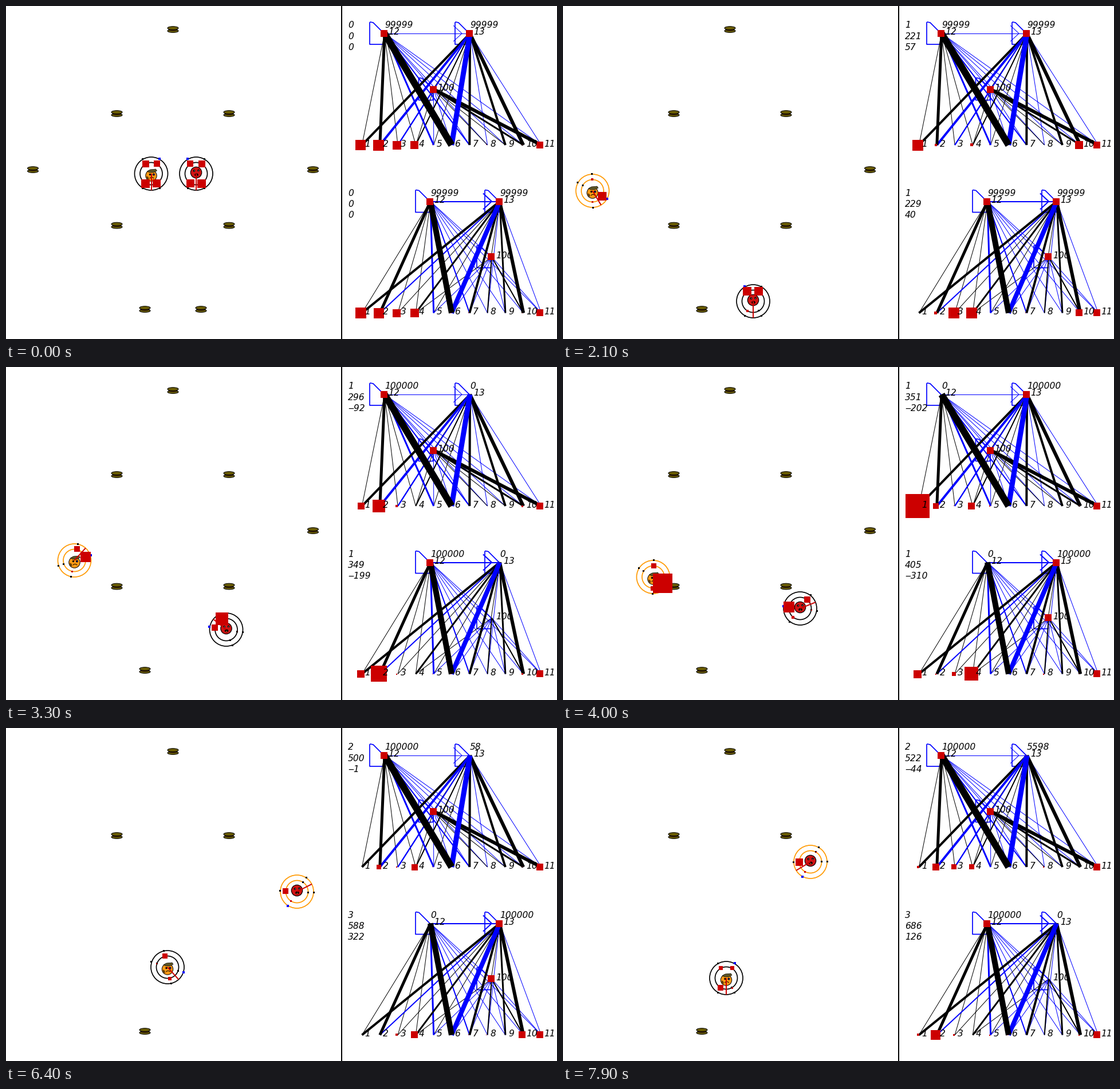
A matplotlib script for the animation above (8000 ms loop, 962 px wide and 582 px high).

```python
import numpy as np
import matplotlib.pyplot as plt
from matplotlib.animation import FuncAnimation
from matplotlib.patches import Arc, Circle, Ellipse, Polygon, Rectangle
from matplotlib.transforms import Affine2D

W, H, DPI = 962, 582, 64
PX = 72 / DPI
FRAMES, STEP = 80, 100
RED, BLUE, ORANGE = "#cc0000", "#0000ff", "#ff9900"
SENSORS = np.array([-30, 30, 150, 210])
EAT = 38        # reach of an agent
CRUISE = 21     # both motors run full until this frame
SWING = 2.4     # frames per half swing of the heading

plt.rcParams.update({"font.family": "DejaVu Sans", "font.style": "oblique",
                     "font.size": 15.5 * PX, "lines.solid_capstyle": "butt"})
fig = plt.figure(figsize=(W / DPI, H / DPI), dpi=DPI, facecolor="white")
ax = fig.add_axes([0, 0, 1, 1])
ax.set(xlim=(0, W), ylim=(H, 0))
ax.axis("off")


def line(xs, ys, color="k", width=1, z=1):
    return ax.plot(xs, ys, color=color, lw=width * PX, zorder=z)[0]


def label(x, y, s=""):
    return ax.text(x, y, s, color="k", va="baseline", zorder=9)


def square(color=RED, z=6):
    return ax.add_patch(Rectangle((0, 0), 0, 0, fc=color, ec="none", zorder=z))


def resize(box, x, y, size):
    size = int(round(size))
    box.set_bounds(round(x - size / 2), round(y - size / 2), size, size)


def sprite(parts, z):
    move = Affine2D()
    for p in parts:
        p.set_transform(move + ax.transData)
        p.set_zorder(z)
        ax.add_artist(p)
    return move


def burger_parts():
    bun = dict(fc="#6b5d00", ec="k", lw=PX)
    return [Ellipse((0, 2.6), 19, 5.6, **bun),
            Ellipse((0, 0.4), 15, 3.5, fc="#5a2a10", ec="k", lw=0.8 * PX),
            Ellipse((0, -2.4), 19, 5.8, **bun)]


def orange_face():
    return [Circle((0, 3.5), 9.7, fc="#ff9a14", ec="k", lw=PX),
            Polygon([(-7, -4), (-2, -7), (8, -8), (10, -5), (4, -2), (-3, -2)],
                    fc="#5c5426", ec="k", lw=0.6 * PX),
            Circle((-2, 1.5), 1.7, fc="k"), Circle((4.5, 1.5), 2, fc="k"),
            Circle((5, 1.5), 0.9, fc="#3030c0"),
            Polygon([(-8, 4), (-5, 6), (-4, 10), (-6, 10), (-8, 8)], fc="#5c3a08"),
            Arc((1, 8.5), 7, 4, theta1=180, theta2=360, ec="k", lw=PX)]


def red_face():
    return [Circle((0, -2), 9.7, fc="#d01414", ec="k", lw=1.2 * PX),
            Circle((-3.5, -5), 1.9, fc="k"), Circle((4, -5.5), 1.9, fc="k"),
            Circle((-3, -5), 0.8, fc="#909090"), Circle((4, -5), 0.8, fc="#909090"),
            Ellipse((0.5, 2), 6.5, 5, fc="k"),
            Ellipse((0.5, 3), 3, 2, fc="#a05020")]


def wires(first, **bold):
    """Thin wires from input `first` on; bold such as k4=(1, 7) sets colour and width."""
    out = {n: ("k" if n < 5 else BLUE, 1) for n in range(first, 12)}
    for key, ns in bold.items():
        out.update({n: (BLUE if key[0] == "b" else "k", int(key[1:])) for n in ns})
    return out


class Net:
    """Wiring diagram with one square per node."""

    def __init__(self, dy, xs, hidden, wiring, arrow, gated):
        self.gated = gated
        inputs = [(619.5 + 31.3 * i, 243 + dy) for i in range(11)]
        motors = [(x, 48 + dy) for x in xs]
        self.nodes = inputs + motors + [hidden]
        for (x, y), wire in zip(motors + [hidden], wiring):
            for n, (color, width) in wire.items():
                bx, by = inputs[n - 1]
                line([x + 1, bx + 2], [y, by], color, width, 2 + width / 100)
        for (x, y), color in zip(motors, (BLUE, "k")):
            line([x + 1, hidden[0]], [y, hidden[1]], color)
        for x, y in motors + [hidden]:
            line([x, x - 19, x - 24, x - 25, x - 25, x, x],
                 [y, y - 19, y - 20, y - 19, y + 19, y + 19, y], BLUE, 1.7)
        (x0, y0), (x1, _) = motors
        line([x0, x1], [y0, y0], BLUE, arrow)
        line([x1 - 28, x1 - 13, x1 - 28], [y0 - 14, y0, y0 + 14], BLUE, arrow)

        for i, (x, y) in enumerate(inputs):
            label(x + 7, y + 2.5, str(i + 1))
        for n, (x, y) in zip(("12", "13"), motors):
            label(x + 7, y + 2, n)
        label(hidden[0] + 8, hidden[1] + 2.5, "100")
        self.values = [label(x + 1, y - 10) for x, y in motors]
        self.stats = [label(597, 38 + dy + 19.5 * i) for i in range(3)]
        self.boxes = [square(z=5) for _ in self.nodes]

    def update(self, inputs, motors, stats):
        hidden = motors[1] if self.gated else 1e5
        sizes = list(inputs) + [12 * m / 1e5 for m in (*motors, hidden)]
        for box, (x, y), s in zip(self.boxes, self.nodes, sizes):
            resize(box, x, y, s)
        for t, v in zip(self.values, motors):
            t.set_text(str(round(v)))
        for t, v in zip(self.stats, stats):
            t.set_text(str(int(v)).replace("-", "\u2012"))


def smell(x, y, angles, targets, gain):
    """How strongly each sensor direction picks up the targets."""
    total = np.zeros(len(angles))
    for tx, ty in targets:
        c = np.cos(angles - np.arctan2(ty - y, tx - x))
        total += np.clip(c, 0, 1) ** 2 / np.hypot(tx - x, ty - y)
    return gain * total


class Agent:
    """Runs along waypoints (frame, x, y, distance, heading), swinging as it goes."""

    def __init__(self, face, way, net):
        self.way, self.net = np.array(way, float), net
        self.rings = [ax.add_patch(Circle((0, 0), r, fill=False, lw=1.7 * PX, zorder=3))
                      for r in (19.5, 29)]
        self.face = sprite(face, 4)
        self.nose = line([0, 0], [0, 0], RED, 2, 5)
        self.dots = [square("k", 5) for _ in range(8)]
        self.marks = [square() for _ in range(4)]

    def pose(self, k):
        k = max(k, 2)
        i = np.flatnonzero(self.way[:-1, 0] <= k)[-1]
        a, b = self.way[i], self.way[i + 1]
        gap = b[0] - a[0]
        f = (k - a[0]) / gap
        phase = np.pi * f * (2 * int(gap / (2 * SWING)) + 1)
        _, x, y, dist, _ = a + (b - a) * f
        turn = b[4] - a[4]
        heading = a[4] + turn * (1 - np.cos(phase)) / 2
        if gap > 2 * SWING:
            y += min(4, abs(turn) / 28) * np.sin(phase)
        bearing = np.degrees(np.arctan2(b[2] - a[2], b[1] - a[1]))
        return x, y, dist, heading, (bearing - heading + 180) % 360 - 180

    def update(self, k, other, food, fed, color, stats):
        x, y, _, heading, off = self.pose(k)
        angles = np.radians(heading + SENSORS)
        scent = smell(x, y, angles, food, 1250)
        rival = smell(x, y, angles, [other], 450)
        meal = 14 * np.exp(-fed / 8)
        off = 0 if k <= CRUISE else off
        motors = [1e5 / (1 + np.exp(-(20 + s * off) / 1.75)) for s in (1, -1)]
        self.net.update([*scent, *rival, 0, meal, 12], motors, stats)

        for ring in self.rings:
            ring.center = x, y
            ring.set_edgecolor(color)
        self.face.clear().translate(x, y)
        a = np.radians(heading)
        self.nose.set_data([x, x + 29 * np.cos(a)], [y, y + 29 * np.sin(a)])
        near = 3 - int(np.argmax(np.round(rival[::-1], 3)))
        for i, (c, s) in enumerate(zip(np.cos(angles), np.sin(angles))):
            resize(self.dots[i], x + 19.5 * c, y + 19.5 * s, 3)
            resize(self.dots[i + 4], x + 29.5 * c, y + 29.5 * s, 4 if i == near else 3)
            self.dots[i + 4].set_facecolor(BLUE if i == near else "k")
            resize(self.marks[i], x + 20 * c, y + 20 * s, scent[i] * 0.79)


top = Net(0, (660, 809), (745.5, 145.5), [
    wires(1, k5=(2,), b3=(5,), k12=(6,), b2=(7,)),
    wires(1, b4=(2,), b2=(3,), k2=(4,), k1=(5,), b9=(6,), k4=(1, 7, 9), k6=(10,)),
    wires(3, b2=(3,), k1=(8, 9), k3=(10,), k6=(11,))], 1, False)
low = Net(293.5, (740, 861), (847, 438.5), [
    wires(1, k5=(2,), b3=(5,), k10=(6,), b2=(7,)),
    wires(1, k4=(1, 7), b2=(2,), k1=(5,), k3=(4, 9), b8=(6,), k6=(10,)),
    wires(4, k2=(8, 10))], 2, True)
line([586, 586], [0, H], "k", 2)

rows = ((0, 41), (98, 188), (244.5, 286), (98, 383.5), (49, 530))
foods = sorted({(291.5 + side * dx, y) for dx, y in rows for side in (-1, 1)})
burgers = []
for place in foods:
    parts = burger_parts()
    sprite(parts, 2).translate(*place)
    burgers.append(parts)

agents = [
    Agent(orange_face(), [
        (2, 253.5, 293, 0, 90), (4, 252, 316, 24, 90), (5, 243, 320, 34, 178),
        (20, 63, 322, 210, 178), (21, 51.5, 323, 221.5, 59),
        (33, 119.5, 338, 296, -48), (40, 157.5, 367, 351, 62),
        (52, 225.5, 382, 426.5, -49), (64, 282, 418, 500.5, 48),
        (79, 285, 437, 522, 90), (90, 265, 480, 560, 60)], top),
    Agent(red_face(), [
        (2, 332, 293, 0, 90), (22.7, 332, 536, 250.4, 90),
        (33, 384.5, 459, 349.5, -141), (40, 414, 422, 405, -22),
        (44, 420, 401, 432, -100), (52, 455, 350, 492.9, 0),
        (64, 508, 286, 588.9, -27), (79, 432, 234, 686.9, -211)], low),
]


def meals():
    """Frame and eater for each burger."""
    eaten = {}
    for k in range(FRAMES):
        for who, agent in enumerate(agents):
            x, y = agent.pose(k)[:2]
            for j, (fx, fy) in enumerate(foods):
                if j not in eaten and np.hypot(fx - x, fy - y) < EAT:
                    eaten[j] = (k, who)
    return eaten


eaten = meals()


def draw(k):
    left = [j for j in range(len(foods)) if j not in eaten or k < eaten[j][0]]
    for j, parts in enumerate(burgers):
        for p in parts:
            p.set_visible(j in left)
    times = [[t for t, w in eaten.values() if w == who and t <= k] for who in (0, 1)]
    stats = []
    for agent, done in zip(agents, times):
        dist = agent.pose(k)[2]
        stats.append((len(done), dist, 500 * len(done) - 2 * dist))
    for who, agent in enumerate(agents):
        rival = 1 - who
        color = ORANGE if stats[who][2] > stats[rival][2] else "k"
        fed = k - max(times[who], default=-20)
        agent.update(k, agents[rival].pose(k)[:2], [foods[j] for j in left],
                     fed, color, stats[who])
    return []


anim = FuncAnimation(fig, draw, frames=FRAMES, interval=STEP, repeat=True,
                     repeat_delay=0, init_func=lambda: draw(0), blit=False)
plt.show()
```
